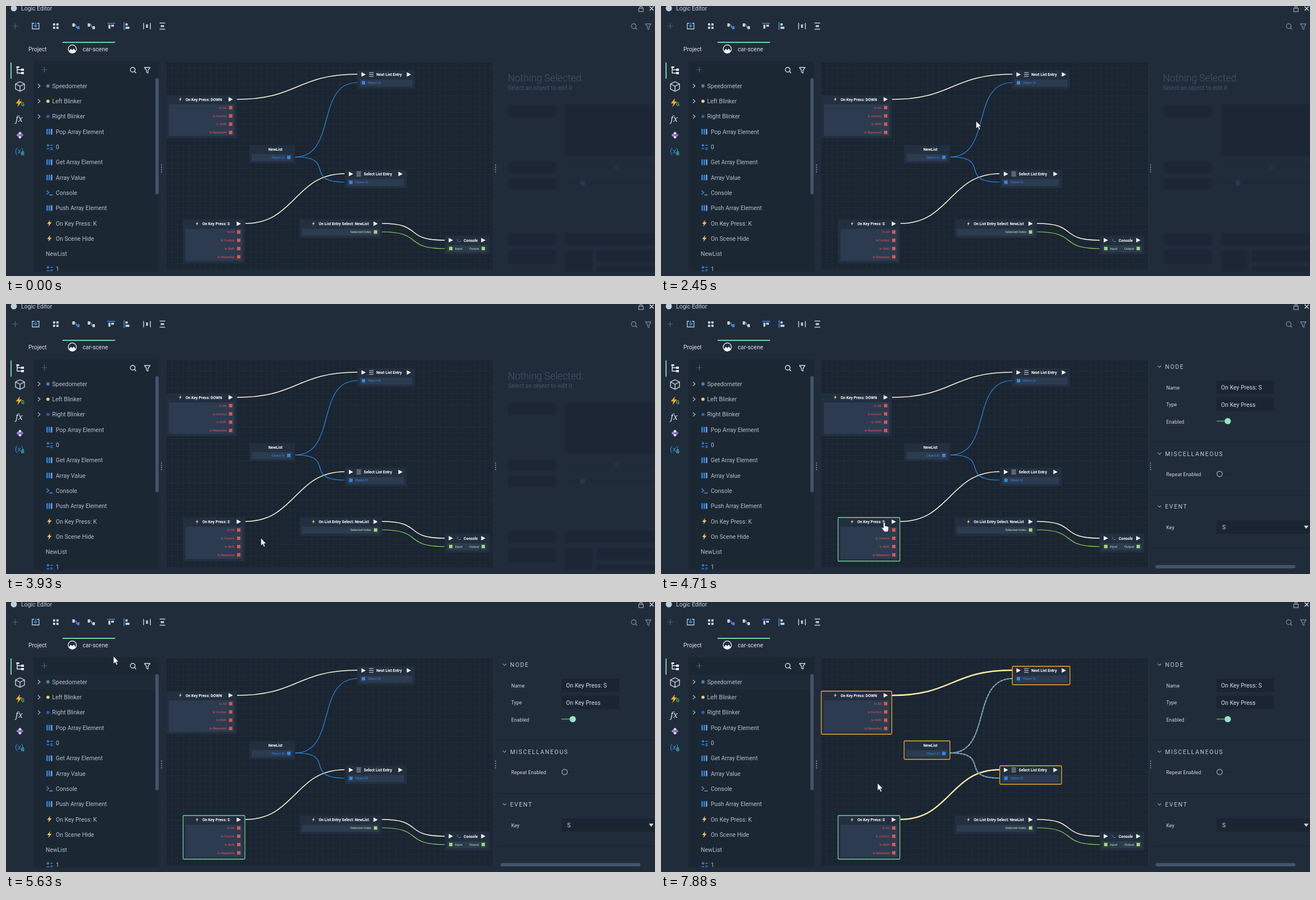
Write an HTML page that moves like this. It is 1160 px wide and 483 px high and loops after 8000 ms.

```html
<!DOCTYPE html>
<html lang="en">
<head>
<meta charset="utf-8">
<title>Logic Editor</title>
<style>
html, body { margin: 0; width: 100%; height: 100%; overflow: hidden; background: #212c3b; }
svg { display: block; width: 1160px; height: 483px; font-family: Roboto, "Open Sans", sans-serif; }
</style>
</head>
<body>
<svg id="stage" viewBox="0 0 1160 483"></svg>
<script>
const C = {
  bg: '#212c3b', panel: '#1c2734', field: '#1b2532', canvas: '#1a2531', text: '#b4bfcb',
  pale: '#c3cedb', muted: '#536277', blue: '#2d8ceb', green: '#74d0a2', lime: '#a2dc6c',
  red: '#dc5850', gold: '#ecb12c', cream: '#fdf8dc', bolt: '#f0c35c'
};

const rect = (x, y, w, h, fill, more = '') =>
  `<rect x="${x}" y="${y}" width="${w}" height="${h}" fill="${fill}" ${more}/>`;
const circle = (x, y, r, fill, more = '') =>
  `<circle cx="${x}" cy="${y}" r="${r}" fill="${fill}" ${more}/>`;
const line = (d, color, width = 1.3, more = '') =>
  `<path d="${d}" fill="none" stroke="${color}" stroke-width="${width}" ${more}/>`;
const shape = (d, fill, more = '') => `<path d="${d}" fill="${fill}" ${more}/>`;
const label = (x, y, s, size = 10.5, fill = C.text, more = '') =>
  `<text x="${x}" y="${y}" font-size="${size}" fill="${fill}" ${more}>${s}</text>`;
const at = (x, y, body, id = '') => `<g ${id && `id="${id}"`} transform="translate(${x} ${y})">${body}</g>`;
const group = (id, body) => `<g id="${id}">${body}</g>`;

// Icons, each centred on 0,0
const icon = {
  plus: line('M-5 0H5M0-5V5', C.muted, 1.2),
  search: c => circle(-1, -1, 4.2, 'none', `stroke="${c}" stroke-width="1.4"`) + line('M2 2L5 5', c, 1.5),
  filter: c => line('M-5-5H5L1.4 0V5L-1.4 3.5V0Z', c, 1.3, 'stroke-linejoin="round"'),
  bolt: c => shape('M1.5-6L-4 1H-.6L-2 6L4-1.6H.5Z', c),
  bars: [-4, 0, 4].map((x, i) => rect(x - 1.2, -5, 2.4, 10, i < 2 ? C.blue : '#7fa9dc')).join(''),
  calc: line('M-5-3H0M-2.5-5.5V-.5M2-3H6M-5 3H0M2 1.8H6M2 4.6H6', C.blue, 1.5),
  prompt: line('M-5-4L-1-.5L-5 3', C.blue, 1.5) + line('M0 4H6', '#84a9d5', 1.3),
  menu: line('M-4-3.3H4M-4 0H4M-4 3.3H4', '#dce3ea', 1),
  play: shape('M-3.6-4V4L4 0Z', '#fffdf0'),
  chevron: line('M-2-3.5L2 0L-2 3.5', C.text, 1.2),
  fold: line('M-3-1.5L0 1.5L3-1.5', '#8996a6', 1.2),
  link: line('M-3-3C3-3-2 3 3 3', '#7f93ad', 1.3) + rect(-6.5, -5, 4.5, 6, C.pale, 'rx="1"')
};

const save = line('M-2.5-5H-6V5H6V-5H2.5', C.pale, 1.3) + line('M0-6V1M-3-1.5L0 1.5L3-1.5', C.blue, 1.6);
const squares = [[-5, -5], [1, -5], [-5, 1], [1, 1]].map(p => rect(...p, 4, 4, C.pale)).join('');
const linkA = icon.link + rect(2, 0, 4.5, 5.5, C.blue, 'rx="1"');
const linkB = icon.link + rect(2, 0, 4.5, 5.5, C.pale, 'rx="1"');
const alignTop = line('M-7-5H7', C.blue, 1.6) + rect(-5, -2.5, 3.5, 7, C.pale) + rect(0, -2.5, 5, 3.5, C.pale);
const alignLeft = line('M-5-7V7', C.blue, 1.6) + rect(-2.5, -5, 4, 4, C.pale) + rect(-2.5, 1, 7, 4, C.pale);
const spreadX = line('M-6-5.5V5.5M6-5.5V5.5', C.pale, 1.5) + rect(-1.7, -3, 3.4, 6, C.pale);
const spreadY = line('M-5-5.5H5M-5 5.5H5', C.pale, 1.5) + rect(-3, -1.7, 6, 3.4, C.pale);

function topBar() {
  return circle(14, 4, 5.5, C.pale) + label(27, 8, 'Logic Editor', 10.5, '#c8d0d9') +
    rect(1131, 4, 8, 6, 'none', `stroke="${C.text}"`) + line('M1133 4V1.5Q1135-1 1137 1.5V4', C.text, 1.1) +
    line('M1150.5 1L1157.5 8M1157.5 1L1150.5 8', '#e1e6ec', 1.4) +
    at(16.5, 36, icon.plus) + at(53, 36, save) + at(89, 36, squares) +
    circle(125, 36, 13, '#37465c', 'id="halo"') +
    at(125, 36, linkA) + at(152.5, 36, linkB) + at(188, 36, alignTop) + at(216, 36, alignLeft) +
    at(252, 36, spreadX) + at(279.5, 36, spreadY) +
    at(1123, 37, icon.search('#748296')) + at(1148, 37, icon.filter('#748296')) +
    label(40, 81, 'Project', 10.4, '#dbe1e7') + rect(101, 64, 94, 2, C.green) +
    circle(118.5, 77, 7.3, 'none', 'stroke="#f2f4f6" stroke-width="1.3"') +
    shape('M112 81L116 76.5L118.5 79L121 76L125 81Q123 84.3 118.5 84.3T112 81Z', '#f2f4f6') +
    label(137, 81, 'car-scene', 10.5, '#dbe1e7');
}

function sideBar() {
  const g = y => label(27, y, 'G', 8.5, '#3fc878', 'font-weight="700"');
  const cube = 'M0-8.5L8-4.5V4.5L0 8.5L-8 4.5V-4.5ZM-8-4.5L0-.5L8-4.5M0-.5V8.5';
  const dia = (x, y, c) => shape(`M${x} ${y - 3}l3 3l-3 3l-3-3Z`, c);
  return rect(8, 101, 2, 29, C.green) +
    at(25, 115, line('M-5-6V5H2M-5-1H2', '#e8edf2', 1.4) + rect(-6.5, -7, 5, 3, '#e8edf2') +
      rect(2, -3, 5, 4, '#e8edf2') + rect(2, 3, 5, 4, '#e8edf2')) +
    at(25, 144, line(cube, '#dce3ea', 1.3)) +
    `<g transform="translate(23 173) scale(1.35)">${icon.bolt('#f6b21b')}</g>` + g(179) +
    label(17, 207, 'fx', 15, '#dce3ea', 'font-style="italic" font-family="Noto Serif, serif"') +
    at(25, 231, dia(0, -3.3, '#e7ddf5') + dia(-3.4, 0, '#a98be8') + dia(3.4, 0, '#8a70dc') + dia(0, 3.4, '#e7ddf5')) +
    label(16, 264, '(x)', 13, C.blue) + g(267);
}

const rows = [
  ['Speedometer', '#4d7fb4'], ['Left Blinker', '#efcb72'], ['Right Blinker', '#2b5fae'],
  ['Pop Array Element', icon.bars], ['0', icon.calc], ['Get Array Element', icon.bars],
  ['Array Value', icon.bars], ['Console', icon.prompt], ['Push Array Element', icon.bars],
  ['On Key Press: K', icon.bolt(C.bolt)], ['On Scene Hide', icon.bolt(C.bolt)], ['NewList', ''], ['1', icon.calc]
];

function listPanel() {
  const body = rows.map(([name, mark], i) => {
    const y = 143 + 27.3 * i, parent = i < 3;
    const x = parent ? 82.5 : mark ? 89 : 71;
    const art = parent ? at(59, y, icon.chevron) + circle(75, y, 2.9, mark) : at(77.5, y, mark);
    return art + label(x, y + 3.8, name);
  }).join('');
  return rect(49, 99, 225, 376, C.panel) + rect(49, 130, 218, 26.5, '#1f2a38', 'id="rowHover"') +
    at(68.5, 114, icon.plus) + at(227.5, 115, icon.search('#d5dce4')) + at(252.5, 115, icon.filter('#d5dce4')) +
    `<g clip-path="url(#listClip)">${body}</g>` + rect(267, 129, 6, 208, '#43536a', 'rx="3"');
}

const key = ['Is Alt', 'Is Control', 'Is Shift', 'Is Repeated'];
const nodes = [
  { x: 286.5, y: 159.5, w: 126, h: 77, title: 'On Key Press: DOWN', mark: 'bolt', out: key, tone: C.red, hot: 1 },
  { x: 316.5, y: 382, w: 110.5, h: 78, title: 'On Key Press: S', mark: 'bolt', out: key, tone: C.red, id: 'keyNode' },
  { x: 434.5, y: 248.5, w: 82, h: 33, title: 'NewList', out: ['Object ID'], tone: C.blue, hot: 1 },
  { x: 628, y: 115, w: 103, h: 33, title: 'Next List Entry', mark: 'menu', in: 'Object ID', tone: C.blue, hot: 1 },
  { x: 605.5, y: 293, w: 110.5, h: 33, title: 'Select List Entry', mark: 'menu', in: 'Object ID', tone: C.blue, hot: 1 },
  { x: 524.5, y: 382, w: 147, h: 33, title: 'On List Entry Select: NewList', mark: 'bolt', out: ['Selected Index'], tone: C.lime },
  { x: 784, y: 411.5, w: 80, h: 33, title: 'Console', mark: 'prompt', in: 'Input', out: ['Output'], tone: C.lime }
];

function drawNode(n) {
  const { x, y, w, h, tone, mark } = n, right = x + w - 11, top = y + 7.5;
  const bold = 'font-weight="700"', source = mark === 'bolt';
  const port = (cx, cy) => rect(cx - 3, cy - 3, 6, 6, tone);
  let s = rect(x, y, w, h, '#222f3f') + rect(x + 4.5, y + 16.5, w - 9, h - 20.5, '#2d3b50');
  if (!mark) s += label(x + w / 2 + 6, top + 2.5, n.title, 6.9, '#fff', bold + ' text-anchor="middle"');
  else {
    const art = source ? icon.bolt(C.bolt) : icon[mark];
    s += `<g transform="translate(${x + 25} ${top}) scale(${mark === 'menu' ? 1 : .62})">${art}</g>` +
      label(x + (source ? 34.5 : 34), top + 2.5, n.title, 6.9, '#fff', bold) + at(right, top, icon.play);
    if (!source) s += at(x + 11, top, icon.play);
  }
  const dark = tone === C.lime ? '#c3e6a8' : tone;
  if (n.in) s += port(x + 11, y + 22.3) + label(x + 18.5, y + 24.3, n.in, 5.8, dark);
  (n.out || []).forEach((name, i) => {
    const py = y + 22.3 + 14.8 * i;
    s += port(right, py) + label(right - 7.5, py + 2, name, 5.8, dark, 'text-anchor="end"');
  });
  return s;
}

const wire = (x1, y1, x2, y2) => {
  const c = Math.max((x2 - x1) / 2, 75);
  return `M${x1} ${y1}C${x1 + c} ${y1} ${x2 - c} ${y2} ${x2} ${y2}`;
};
const flow = [wire(413, 167, 628, 122), wire(428, 389, 605, 300)];
const data = [wire(517, 270, 628, 137), wire(517, 270, 605, 315)];
const frame = (n, color) =>
  rect(n.x, n.y, n.w, n.h, 'none', `rx="1.5" stroke="${color}" stroke-width="1.3"`);

function graph() {
  const hot = nodes.filter(n => n.hot).map(n => frame(n, C.gold)).join('');
  const keyNode = nodes.find(n => n.id);
  return rect(286, 100, 584, 372, C.canvas) + rect(286, 100, 584, 372, 'url(#grid)') +
    nodes.map(drawNode).join('') +
    flow.map(d => line(d, C.cream, 1.6)).join('') + data.map(d => line(d, C.blue, 1.2)).join('') +
    line(wire(672, 389, 784, 419), C.cream, 1.6) + line(wire(672, 404, 784, 434), C.lime, 1.1) +
    group('linked', flow.map(d => line(d, '#ffe9a4', 2.4)).join('') +
      data.map(d => line(d, '#4b8fce', 2.1) + line(d, '#c3a765', 1.6, 'stroke-dasharray="3 3"')).join('') + hot) +
    group('keyHover', frame(keyNode, '#55708a')) + group('keyPicked', frame(keyNode, C.green));
}

function emptyPanel() {
  const block = (x, y, w, h) => rect(x, y, w, h, '#1d2734');
  return group('empty', '<g filter="url(#soft)">' + block(898, 177, 86, 22) + block(1001, 176, 160, 92) +
    block(898, 279, 86, 20) + block(898, 308, 86, 20) + block(898, 406, 86, 22) + block(1001, 406, 160, 22) +
    block(898, 436, 86, 26) + block(1001, 437, 47, 38) + block(1056, 437, 105, 21) + block(1056, 466, 105, 10) +
    line('M1001 288H1160M1001 317H1160', '#1e2936', 2) + circle(1091, 288, 5, '#253140') +
    circle(1031, 317, 5, '#2b3747') + '</g>' +
    label(897, 135, 'Nothing Selected.', 17.6, '#465364', 'font-weight="300"') +
    label(897, 150, 'Select an object to edit it', 10.5, '#465364'));
}

function detailPanel() {
  const head = (y, s) => at(891, y, icon.fold) + label(901, y + 4, s, 10.5, '#c0cad4', 'letter-spacing="1.65"');
  const name = (y, s) => label(903, y + 3.5, s, 9, '#ccd4dc');
  const field = (y, s) => rect(993, y - 12, 103, 24, C.field) + label(1001, y + 4, s, 10.5, '#d5dce3');
  const rule = y => rect(879, y, 281, 1, '#18222e');
  return group('details', head(112, 'NODE') + name(149, 'Name') + field(149, 'On Key Press: S') +
    name(179.5, 'Type') + field(179.5, 'On Key Press') + name(210, 'Enabled') +
    line('M993 209.5H1013', '#5fae8e', 1.4) + circle(1013, 209.5, 5.6, '#92e6c2') + rule(247) +
    head(267.5, 'MISCELLANEOUS') + name(304, 'Repeat Enabled') + line('M1004 304H1019', '#18222e', 1.4) +
    circle(998.5, 304, 4.8, 'none', 'stroke="#7fa79a" stroke-width="1.5"') + rule(342) +
    head(362, 'EVENT') + name(399, 'Key') + rect(993, 387, 167, 24, C.field) +
    label(1003, 403, 'S', 10.5, '#d5dce3') + shape('M1149 396.5H1157.5L1153.2 402Z', '#d5dce3') + rule(436) +
    rect(884, 467, 250, 6, '#43536a', 'rx="3"'));
}

const grip = x => [0, 1, 2, 3].map(i => rect(x - 1, 283.5 + 4 * i, 2, 2, '#768397')).join('');
const arrow = shape('M0 0V13.6L3.2 10.7L5.4 15.8L7.6 14.8L5.4 9.9H9.5Z', '#fff', 'stroke="#111820" stroke-width=".7"');
const hand = shape('M-1.6 1.2Q-1.6-.4 0-.4T1.6 1.2V6L6 6.8Q8.3 7.2 8 9.5L7 14V16.6H-.6V14.8L-4.6 10Q-5.6 8.2-3.8 8.2L-1.6 10Z',
  '#fff', 'stroke="#111820" stroke-width=".7"');

const stage = document.getElementById('stage');
stage.innerHTML = `<defs>
  <pattern id="grid" x="286" y="100" width="10" height="10" patternUnits="userSpaceOnUse">
    ${line('M0 .5H10M.5 0V10', '#202c39', 1)}</pattern>
  <clipPath id="listClip"><rect x="49" y="129" width="218" height="346"/></clipPath>
  <filter id="soft"><feGaussianBlur stdDeviation="1.2"/></filter></defs>` +
  rect(0, 0, 1160, 483, C.bg) + topBar() + sideBar() + listPanel() + graph() +
  grip(278) + grip(875) + emptyPanel() + detailPanel() +
  at(0, 0, circle(0, 0, 12, '#ff0', 'id="click" opacity=".45"') + group('arrow', arrow) + group('hand', hand), 'pointer');

// Pointer strokes: start, end, number of steps, points evenly spaced in time
const moves = [
  [200, 280, 2, [[698, 462], [664, 457], [630, 452]]],
  [980, 1760, 11, [[630, 452], [572, 452], [511, 451], [467, 446]]],
  [1830, 2600, 11, [[467, 446], [434, 350], [470, 290], [550, 215], [598, 181]]],
  [2680, 3450, 11, [[598, 181], [617, 137], [480, 240], [352, 343], [367, 395]]],
  [3530, 4250, 10, [[367, 395], [400, 420], [466, 430], [440, 402], [399, 391]]],
  [5010, 5630, 9, [[399, 391], [330, 300], [230, 150], [192, 97]]],
  [5950, 6400, 7, [[192, 97], [163, 72], [131, 45]]],
  [7340, 7880, 8, [[131, 45], [190, 130], [300, 250], [387, 324]]]
];

function along(points, u) {
  const p = u * (points.length - 1), i = Math.min(Math.floor(p), points.length - 2);
  return points[i].map((v, k) => v + (points[i + 1][k] - v) * (p - i));
}

function pointerAt(t) {
  const move = moves.filter(m => t >= m[0]).pop();
  if (!move) return null;
  const [start, end, steps, points] = move;
  const step = Math.min(steps, Math.floor((t - start) / (end - start) * (steps - 1) + 1e-6) + 1);
  return along(points, step / steps);
}

const el = id => document.getElementById(id);
const show = (id, on) => el(id).setAttribute('visibility', on ? 'visible' : 'hidden');
const within = (t, a, b) => t >= a && t < b;

function draw(t) {
  const pos = pointerAt(t);
  const [x, y] = pos || [-50, -50];
  const overKey = x > 316 && x < 428 && y > 381 && y < 460;
  const picked = t >= 4620;
  el('pointer').setAttribute('transform', `translate(${x.toFixed(1)} ${y.toFixed(1)})`);
  show('arrow', pos && !overKey);
  show('hand', overKey);
  show('click', within(t, 4460, 4620) || within(t, 6650, 6880));
  show('halo', Math.hypot(x - 125, y - 36) < 13);
  show('rowHover', t >= 5480);
  show('keyHover', overKey && !picked);
  show('keyPicked', t >= 4540);
  show('empty', !picked);
  show('details', picked);
  show('linked', t >= 6880);
}

const begin = performance.now();
function tick() {
  draw((performance.now() - begin) % 8000);
  requestAnimationFrame(tick);
}
tick();
</script>
</body>
</html>
```
